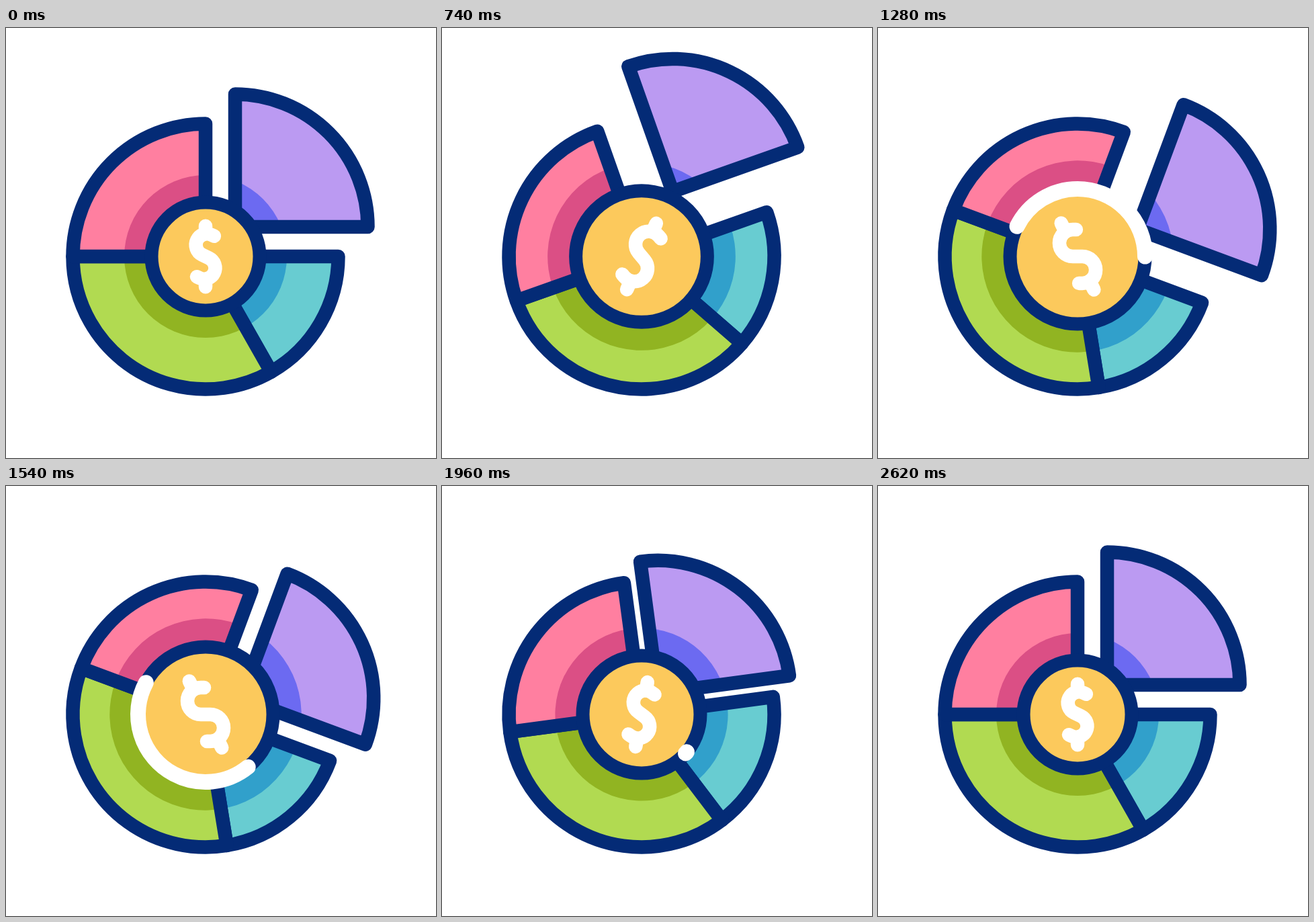
Write an HTML page with a canvas that moves like this. It is 640 by 640 pixels and loops after 3 s.

```html
<!DOCTYPE html>
<html lang="en">
<head>
<meta charset="utf-8">
<title>Pie chart</title>
<style>
html, body { margin: 0; width: 100%; height: 100%; overflow: hidden; background: #fff; }
canvas { display: block; width: 640px; height: 640px; }
</style>
</head>
<body>
<canvas id="stage" width="640" height="640"></canvas>
<script>
const ctx = document.getElementById('stage').getContext('2d');
const LOOP = 3000;
const CX = 297, CY = 340, PIE = 197.5;
const NAVY = '#042b76';
const TAU = Math.PI * 2;
const rad = deg => deg * Math.PI / 180;

// Keys are [time, value] pairs, eased in and out between neighbours.
function track(t, ...keys) {
  if (t <= keys[0][0]) return keys[0][1];
  for (let i = 1; i < keys.length; i++) {
    const [t0, a] = keys[i - 1], [t1, b] = keys[i];
    if (t < t1) {
      const u = (t - t0) / (t1 - t0);
      return a + (b - a) * u * u * (3 - 2 * u);
    }
  }
  return keys[keys.length - 1][1];
}

function disc(r, color) {
  ctx.beginPath();
  ctx.arc(0, 0, r, 0, TAU);
  ctx.fillStyle = color;
  ctx.fill();
}

function stroke(color, width) {
  ctx.strokeStyle = color;
  ctx.lineWidth = width;
  ctx.stroke();
}

function sectorPath(from, to, offset) {
  ctx.beginPath();
  ctx.moveTo(offset, -offset);
  ctx.arc(offset, -offset, PIE, rad(from), rad(to));
  ctx.closePath();
}

// The inner shade stays centred on the coin even when the sector moves out.
function sector(from, to, color, shade, shadeRadius, offset = 0) {
  ctx.save();
  sectorPath(from, to, offset);
  ctx.fillStyle = color;
  ctx.fill();
  ctx.clip();
  disc(shadeRadius, shade);
  ctx.restore();
  sectorPath(from, to, offset);
  stroke(NAVY, 20.5);
}

function dollar(angle, scale) {
  const c = 5.75 * scale, r = 16.4 * scale, end = 1.6 * scale;
  ctx.save();
  ctx.rotate(rad(angle));
  ctx.beginPath();
  for (const side of [-1, 1]) {
    ctx.moveTo(0, side * 45.2 * scale);
    ctx.lineTo(0, side * 34 * scale);
  }
  stroke('#fff', 20.5);
  ctx.rotate(rad(26));
  ctx.beginPath();
  ctx.moveTo(-end, -2 * r);
  ctx.lineTo(-c, -2 * r);
  ctx.arc(-c, -r, r, -Math.PI / 2, Math.PI / 2, true);
  ctx.lineTo(c, 0);
  ctx.arc(c, r, r, -Math.PI / 2, Math.PI / 2);
  ctx.lineTo(end, 2 * r);
  stroke('#fff', 20.5);
  ctx.restore();
}

function glint(t, turn, radius) {
  const head = track(t, [826, 88.3], [1663, -323.7]);
  const tail = track(t, [1000, 88.3], [2000, -323.7]);
  if (tail - head < 0.01) return;
  const shift = -0.44 * turn;
  ctx.beginPath();
  ctx.arc(0, 0, radius, rad(tail + shift), rad(head + shift), true);
  stroke('#fff', 23);
}

function draw(t) {
  const turn = track(t, [200, 0], [800, -20], [1400, 25], [2000, -8], [2600, 0]);
  const tilt = track(t, [200, 0], [800, 24.6], [1400, -32], [2000, 10.9], [2600, 0]);
  const slide = track(t, [200, 44], [1000, 86], [1800, 26.3], [2600, 44]);
  const grow = track(t, [200, 0], [900, 1], [1600, 1], [2200, 0]);
  const coin = 80.5 + 20 * grow;
  const shade = 121 + 21.7 * grow;

  ctx.setTransform(1, 0, 0, 1, 0, 0);
  ctx.fillStyle = '#fff';
  ctx.fillRect(0, 0, 640, 640);
  ctx.lineCap = ctx.lineJoin = 'round';
  ctx.translate(CX, CY);

  ctx.save();
  ctx.rotate(rad(turn));
  sector(0, 60.4, '#68ccd1', '#31a0cb', shade);
  sector(60.4, 180, '#b1da51', '#91b422', shade);
  sector(180, 270, '#ff7fa0', '#db4f85', shade);
  sector(270, 360, '#bb9af2', '#6c6af1', shade, slide);
  ctx.restore();

  disc(coin, '#fcc95c');
  stroke(NAVY, 20);
  glint(t, turn, coin);
  dollar(tilt, 1 + 0.22 * grow);
}

function frame() {
  draw(performance.now() % LOOP);
  requestAnimationFrame(frame);
}
frame();
</script>
</body>
</html>
```
